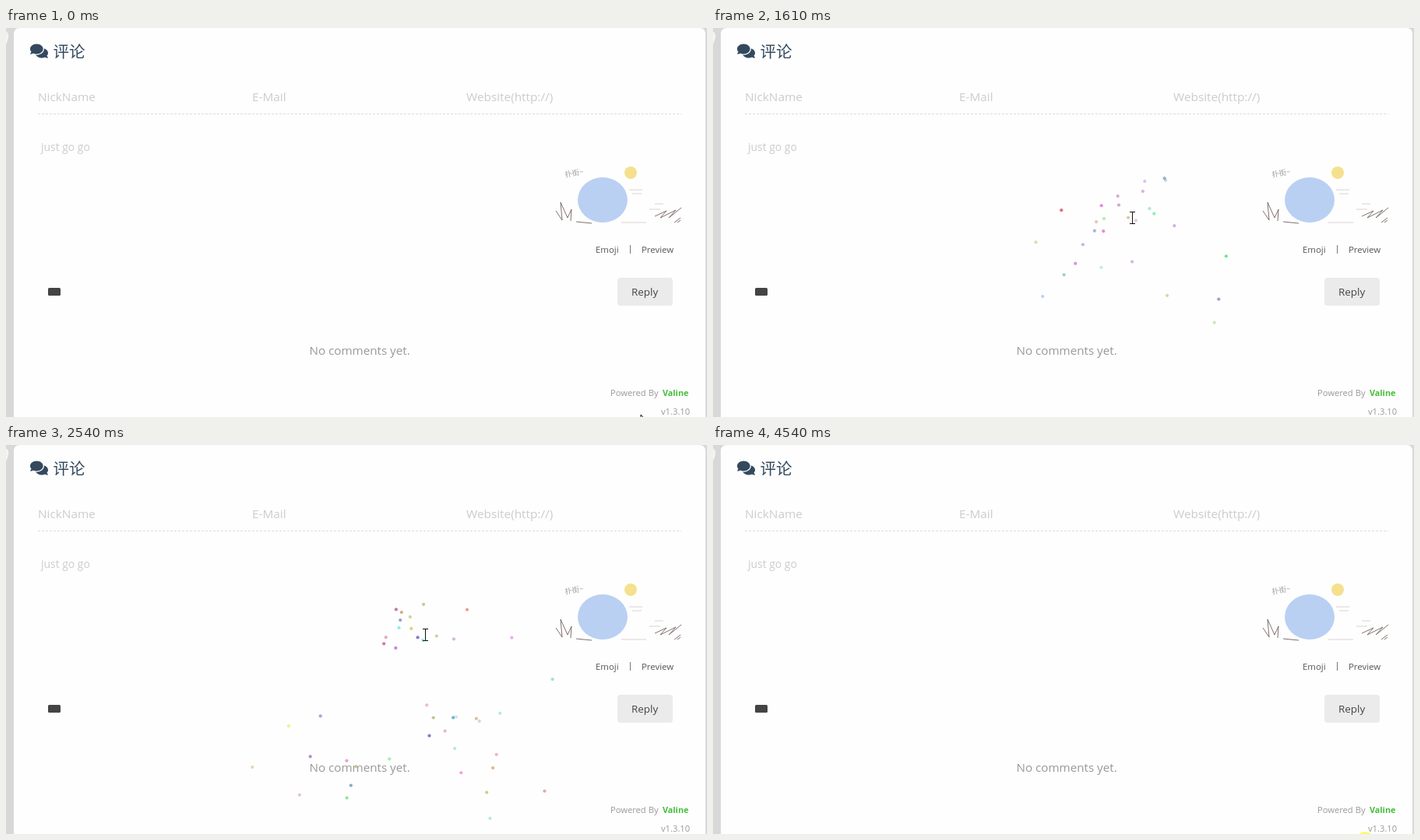
An HTML page with a canvas that plays this animation: 900 by 500 pixels, repeating every 4620 ms.

```html
<!DOCTYPE html>
<html lang="zh">
<head>
<meta charset="utf-8">
<title>评论</title>
<style>
  html, body { margin: 0; width: 100%; height: 100%; overflow: hidden; background: #fefefe; }
  svg, canvas { position: absolute; left: 0; top: 0; width: 900px; height: 500px; }
  text { font-family: "Open Sans", "Noto Sans", sans-serif; }
  .title { font: 400 20.5px "Noto Sans CJK SC", "Noto Sans CJK", sans-serif; fill: #34495e; }
  .field { font-size: 15.35px; fill: #ccc; }
  .hint { font-size: 13.9px; fill: #ccc; }
  .link { font-size: 11.4px; fill: #555; }
  .reply { font-size: 13.4px; fill: #444; }
  .empty { font-size: 15.2px; fill: #999; }
  .foot { font-size: 11.2px; fill: #999; }
  .brand { font-size: 10.8px; font-weight: 700; fill: #44bd3b; }
  .scribble { font: 9.5px "Noto Sans CJK SC", "Noto Sans CJK", sans-serif; fill: #a39b9f; }
</style>
</head>
<body>
<svg viewBox="0 0 900 500">
  <rect width="900" height="500" fill="#d8d8d8"/>
  <path d="M0 4q4 3 3 8t-3 9z" fill="#f4f4f4"/>
  <path d="M10 500V8q0-8 8-8H890q8 0 8 8V500z" fill="#fefefe"/>

  <path transform="translate(31 19.300) scale(.04)" fill="#34495e" d="M416 192c0-88-93-160-208-160S0 104 0 192c0 34 14 66 38 92-13 30-35 54-36 54-5 6-1 14 6 14 37 0 67-12 89-25 32 16 70 25 111 25 115 0 208-72 208-160zm122 220c24-26 38-58 38-92 0-67-53-124-129-148 1 7 1 13 1 20 0 106-108 192-240 192-11 0-21-1-32-2C208 440 282 480 368 480c41 0 79-9 111-25 22 13 52 25 89 25 7 0 11-8 6-14 0 0-23-24-36-54z"/>
  <text class="title" x="60.500" y="37.500">评论</text>

  <text class="field" x="41" y="94">NickName</text>
  <text class="field" x="316" y="94">E-Mail</text>
  <text class="field" x="591" y="94">Website(http://)</text>
  <path d="M41 110.500H316M316 110.500H591M591 110.500H867" stroke="#dcdcdc" stroke-dasharray="3 2"/>
  <text class="hint" x="45" y="158">just go go</text>

  <text class="scribble" transform="translate(718 192) rotate(-10)">扑街~</text>
  <ellipse cx="766" cy="221" rx="32" ry="29" fill="#b9d0f3"/>
  <circle cx="802" cy="186" r="8" fill="#f5e08e"/>
  <g fill="none" stroke="#75605f" stroke-width=".9">
    <path d="M706 235l8 12-2-23 9 20 5-11-1 15M732 249l20 2M833 242l15-7-8 9 20-10-9 10 16-13M858 250l8-6M862 250l4-3"/>
    <path d="M800 208h17M804 213h12M833 226h11M826 233h14M790 250h32" stroke="#d8cbc8"/>
  </g>

  <text class="link" x="757" y="289">Emoji</text>
  <path d="M801.500 279v11" stroke="#777"/>
  <text class="link" x="816" y="289">Preview</text>
  <rect x="54" y="334" width="16" height="10" rx="1.500" fill="#444"/>
  <rect x="785" y="321" width="71" height="36" rx="4" fill="#ebebeb"/>
  <text class="reply" x="803" y="344">Reply</text>
  <text class="empty" x="389.500" y="420">No comments yet.</text>
  <text class="foot" x="776" y="473">Powered By</text>
  <text class="brand" x="843" y="473">Valine</text>
  <text class="foot" x="841" y="497">v1.3.10</text>
</svg>
<canvas id="stage" width="900" height="500"></canvas>
<script>
const ctx = document.getElementById('stage').getContext('2d');
const LOOP = 4620, STEP = 77, PRESS = 60, TAU = Math.PI * 2;
const HOME = { x: 538, y: 244 };
const GRAVITY = 2200;
const clicks = [610, 770, 810, 1240, 1470, 1640, 1780, 1880, 2040, 2080,
                2395, 2610, 2930, 3035, 3190, 3215];

let seed = 20;
function rand() {
  seed = (seed * 1664525 + 1013904223) % 4294967296;
  return seed / 4294967296;
}

const dots = clicks.flatMap(born => Array.from({ length: 14 }, () => ({
  born,
  vx: (rand() * 2 - 1) * 370,
  vy: -rand() * 510,
  color: `hsla(${rand() * 360}, ${30 + rand() * 50}%, ${50 + rand() * 22}%, ${0.4 + rand() * 0.5})`
})));

function disc(x, y, r, color) {
  ctx.fillStyle = color;
  ctx.beginPath();
  ctx.arc(x, y, r, 0, TAU);
  ctx.fill();
}

function drawDots(time) {
  for (const d of dots) {
    const age = (time - d.born) / 1000;
    if (age < 0 || age > 1) continue;
    const y = HOME.y + d.vy * age + GRAVITY / 2 * age * age;
    if (y < 503) disc(HOME.x + d.vx * age, y, 2.1, d.color);
  }
}

function drawPointer(x, y) {
  if (y < 270) {
    ctx.fillStyle = '#111';
    ctx.fillRect(x, y - 7, 1, 14);
    ctx.fillRect(x - 3, y - 8, 7, 1);
    ctx.fillRect(x - 3, y + 7, 7, 1);
    return;
  }
  ctx.beginPath();
  [[0, 0], [0, 16], [4, 13], [7, 19], [9, 18], [6, 12], [11, 12]]
    .forEach(([dx, dy]) => ctx.lineTo(x + dx, y + dy));
  ctx.closePath();
  ctx.fillStyle = '#fff';
  ctx.strokeStyle = '#111';
  ctx.fill();
  ctx.stroke();
}

function mix(a, b, p) {
  const s = p * p * (3 - 2 * p);
  return Math.round(a + (b - a) * s);
}

function movePointer(step) {
  if (step <= 42) {
    const p = Math.min(1, step / 6);
    drawPointer(mix(815, HOME.x, p), mix(497, HOME.y, p));
  } else if (step < 47) {
    const p = (step - 42) / 5;
    drawPointer(mix(HOME.x, 600, p), mix(HOME.y, 520, p));
  }
}

function draw(now) {
  const t = now % LOOP;
  const step = Math.floor((t + 12) / STEP) % 60;
  const time = step * STEP;
  ctx.clearRect(0, 0, 900, 500);

  // The caret blinks every 530 ms once the field has focus.
  if (t >= 600 && t < 4310 && Math.floor((t - 600) / 530) % 2 === 0) {
    ctx.fillStyle = '#222';
    ctx.fillRect(46, 144, 1, 19);
  }
  drawDots(time);
  if (clicks.some(c => time >= c && time < c + PRESS)) {
    disc(536, 243, 12, 'rgba(250,250,40,.75)');
  }
  if (step === 59) disc(837, 509, 12, '#fafa6a');
  movePointer(step);
}

const start = performance.now();
function tick() {
  draw(performance.now() - start);
  requestAnimationFrame(tick);
}
tick();
</script>
</body>
</html>
```
